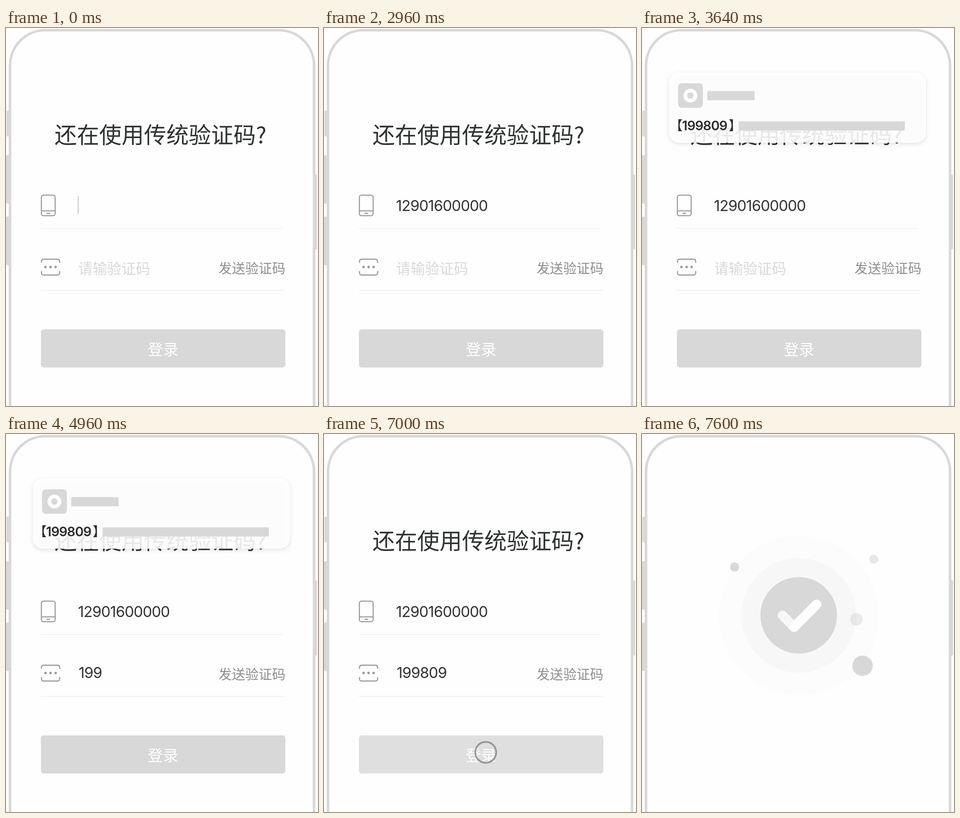
These frames come from a looping animation (679 by 824 pixels, 8160 ms). An HTML page:

```html
<!DOCTYPE html>
<html lang="zh-CN">
<head>
<meta charset="utf-8">
<title>验证码登录</title>
<style>
html, body { margin: 0; width: 100%; height: 100%; overflow: hidden; background: #fefefe; }
svg { display: block; width: 679px; height: 824px; }
text { font-family: "Noto Sans CJK SC", "Noto Sans CJK", sans-serif; white-space: pre; }
.digits { font: 400 32.5px Inter, "Liberation Sans", sans-serif; letter-spacing: -0.9px; fill: #333; }
.grey { fill: #d8d8d8; }
.icon { fill: none; stroke: #999; stroke-width: 2.3; }
.rule { stroke: #f2f2f2; stroke-width: 2; }
.caret { fill: #ccc; }
.tap { fill: none; stroke: #888; stroke-width: 3.6; }
.arm { fill: none; stroke-width: 21; stroke-linecap: round; }
.cardRect { fill: #fff; fill-opacity: .89; filter: drop-shadow(0 3px 5px rgba(0, 0, 0, .12)); }
</style>
</head>
<body>
<svg viewBox="0 0 679 824">
  <rect width="679" height="824" fill="#fefefe"/>
  <g class="grey">
    <rect x="1" y="180" width="9" height="56.5" rx="3"/>
    <rect x="0" y="277" width="9" height="106" rx="3"/>
    <rect x="0" y="411" width="9" height="106" rx="3"/>
    <rect x="669" y="319" width="8" height="164" rx="3"/>
  </g>
  <rect x="8.8" y="4.8" width="661.6" height="900" rx="77" fill="#fefefe" stroke="#d8d8d8" stroke-width="5.6"/>

  <g id="login">
    <text x="105.5" y="251" font-size="48.7" fill="#2e3231">还在使用传统验证码?</text>

    <g class="icon">
      <rect x="77" y="364.3" width="30" height="44.9" rx="4.5"/>
      <path d="M77 398.7H107M88.2 404H95.8"/>
    </g>
    <path class="rule" d="M76 437H602"/>
    <text id="phone" class="digits" x="156.5" y="399"></text>

    <g class="icon">
      <path d="M77.2 512V509Q77.2 504 82.2 504H111.8Q116.8 504 116.8 509V512M77.2 530V533.500Q77.2 538.500 82.2 538.500H111.8Q116.8 538.500 116.8 533.500V530"/>
      <g fill="#999" stroke="none">
        <circle cx="86" cy="521" r="2.7"/>
        <circle cx="97" cy="521" r="2.7"/>
        <circle cx="108" cy="521" r="2.7"/>
      </g>
    </g>
    <path class="rule" d="M76 572H607"/>
    <text id="hint" x="157" y="536.3" font-size="31.4" fill="#d9d9d9">请输验证码</text>
    <text id="code" class="digits" x="158" y="532.4"></text>
    <text x="462.5" y="535" font-size="29.1" fill="#8e8e8e">发送验证码</text>

    <rect id="phoneCaret" class="caret" y="366" width="2.4" height="39.5"/>
    <rect id="codeCaret" class="caret" x="156" y="501.500" width="2.4" height="39.5"/>

    <g id="button">
      <rect class="grey" x="76" y="657" width="532" height="83" rx="6"/>
      <text x="308.5" y="713" font-size="33.3" font-weight="500" fill="#fff">登录</text>
    </g>
    <circle id="sendTap" class="tap" cx="547.5" cy="537.5"/>
    <circle id="loginTap" class="tap" cx="352" cy="694"/>
  </g>

  <g id="card">
    <rect class="cardRect" x="58.5" y="97" width="559.5" height="153" rx="22"/>
    <g class="grey">
      <rect x="78.5" y="120.500" width="54" height="53.5" rx="8"/>
      <rect x="142" y="137.500" width="103" height="20" rx="1.500"/>
      <rect x="210.500" y="203.500" width="361.500" height="20" rx="1.500"/>
    </g>
    <circle cx="105.3" cy="147.3" r="11" fill="none" stroke="#fff" stroke-width="8"/>
    <g font-size="28" font-weight="500" fill="#2b2d2d">
      <text x="60.5" y="223.3">【</text>
      <text x="87" y="223" style="font: 600 28.5px Inter, 'Liberation Sans', sans-serif; letter-spacing: -.9px">199809</text>
      <text x="188.5" y="223.3">】</text>
    </g>
  </g>

  <g id="success">
    <circle cx="341" cy="395.3" r="173.5" fill="#fcfcfc"/>
    <circle cx="341" cy="395.3" r="125" fill="#f7f7f7"/>
    <g class="grey">
      <circle cx="341" cy="395.3" r="83.3"/>
      <circle cx="201.500" cy="290" r="10"/>
      <circle cx="504.500" cy="273" r="10" opacity=".6"/>
      <circle cx="466.500" cy="404" r="13.7" opacity=".5"/>
      <circle cx="480" cy="505.3" r="22.2"/>
    </g>
    <path class="arm" stroke="#f7f7f7" d="M306 395.500L331 421"/>
    <path class="arm" stroke="#fff" d="M331 421L380 371.500"/>
  </g>
</svg>

<script>
const LOOP = 8160, STEP = 40;
const PHONE = "12901600000", CODE = "199809";
const PHONE_KEYS = [160, 320, 480, 640, 800, 960, 1160, 1320, 1520, 1680, 1840];
const CODE_KEYS = [4560, 4640, 4960, 5280, 5600, 5920];

const $ = id => document.getElementById(id);
const progress = (t, start, length) => Math.min(1, Math.max(0, (t - start) / length));
const fade = (id, opacity) => $(id).setAttribute("opacity", opacity);
const slide = (id, x, y) => $(id).setAttribute("transform", `translate(${x} ${y})`);

function type(id, text, keys, t) {
  $(id).textContent = text.slice(0, keys.filter(key => key <= t).length);
}

function tap(id, start, t) {
  const p = (t - start + STEP) / 240;
  const active = p > 0.1 && p < 1;
  $(id).setAttribute("r", active ? 20 + 17 * p : 0);
  fade(id, active ? 1 - p : 0);
}

function render(t) {
  type("phone", PHONE, PHONE_KEYS, t);
  type("code", CODE, CODE_KEYS, t);

  // The phone caret fades out, then blinks once after the last digit.
  const blink = t >= 2080 && t < 2240 ? (t < 2160 ? 0.6 : 1) : 0;
  $("phoneCaret").setAttribute("x", t < 2000 ? 156 : 368.8);
  fade("phoneCaret", t < 2000 ? 1 - progress(t, 40, 160) : blink);
  fade("hint", 1 - progress(t, 3880, 80));
  fade("codeCaret", progress(t, 4120, 80) - progress(t, 4480, 80));

  tap("sendTap", 2760, t);
  tap("loginTap", 7000, t);
  fade("button", t >= 7000 ? 0.8 + 0.2 * progress(t, 7000, 200) : 1);

  const shown = progress(t, 3330, 300) - progress(t, 6035, 250);
  fade("card", shown);
  slide("card", 0, -52 * (1 - shown));

  const done = progress(t, 7440, 160);
  fade("login", 1 - done);
  fade("success", done);
  slide("success", 679 * (1 - done), 0);
}

const origin = performance.now();
function tick() {
  const t = (performance.now() - origin) % LOOP;
  render(Math.floor(t / STEP) * STEP);
  requestAnimationFrame(tick);
}
render(0);
requestAnimationFrame(tick);
</script>
</body>
</html>
```
